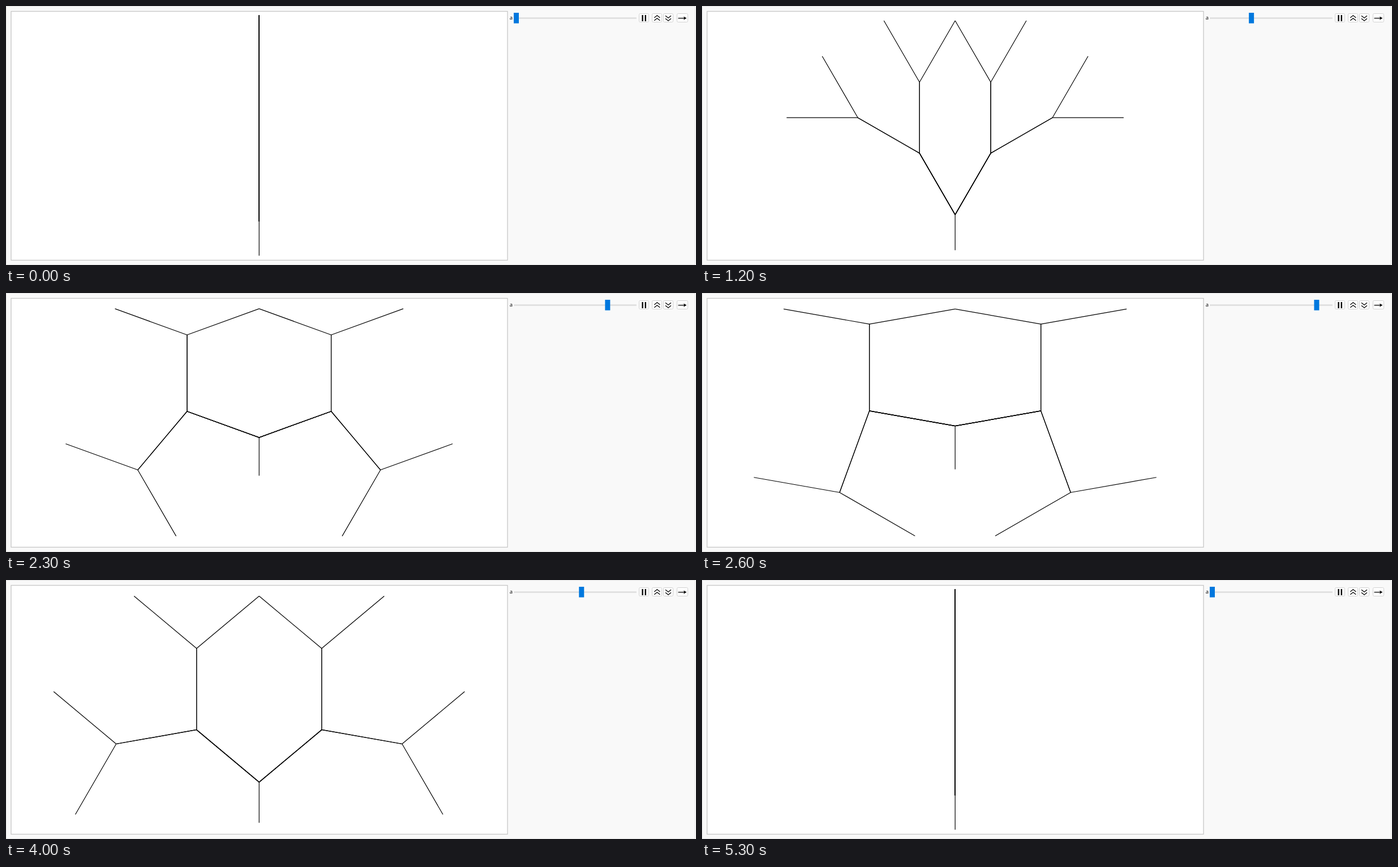
An HTML page for the animation above (6 s loop, 1219 by 459 pixels).

```html
<!DOCTYPE html>
<html lang="en">
<head>
<meta charset="utf-8">
<title>Branching tree</title>
<style>
  html, body { margin: 0; width: 100%; height: 100%; overflow: hidden; background: #fff; }
  svg { display: block; width: 1219px; height: 459px; }
  text { font: 9.5px "Open Sans", "Noto Sans", sans-serif; }
  .line { fill: none; stroke: #000; stroke-width: 1.2; stroke-linejoin: round; }
  .button { fill: #fff; stroke: #d2d2d2; }
  .icon { fill: none; stroke: #000; stroke-width: 1.3; }
</style>
</head>
<body>
<svg viewBox="0 0 1219 459">
  <rect x=".5" y=".5" width="1217" height="458" fill="#f9f9f9" stroke="#e4e4e4"/>
  <rect x="9" y="9.5" width="877" height="441" fill="#fff" stroke="#c6c6c6" stroke-width="1.3"/>
  <g id="tree"></g>

  <text x="889.7" y="24">a</text>
  <rect x="897" y="20.3" width="217" height="2.4" rx="1" fill="#dedede"/>
  <rect id="thumb" x="897" y="12" width="9" height="18.7" fill="#0078de"/>

  <g class="button">
    <rect x="1118.5" y="13.5" width="17" height="15" rx="2"/>
    <rect x="1141.5" y="13.5" width="17" height="15" rx="2"/>
    <rect x="1161.5" y="13.5" width="17" height="15" rx="2"/>
    <rect x="1185.5" y="13.5" width="19" height="15" rx="2"/>
  </g>
  <path d="M1123.4 16h2.3v11h-2.3zM1128.6 16h2.3v11h-2.3z"/>
  <path class="icon" d="M1145.3 20.8l5-4 5 4M1145.3 25.8l5-4 5 4"/>
  <path class="icon" d="M1165 17.2l5 4 5-4M1165 22.2l5 4 5-4"/>
  <path class="icon" d="M1187.5 21.6h12"/>
  <path d="M1197 18.4l5.4 3.2-5.4 3.2 1.2-3.2z"/>
</svg>
<script>
const LOOP = 6000;
const CENTER = { x: 447.2, y: 229.4 };
const STARTS = [0, 700, 1000, 1200, 1500, 1800, 2000, 2300, 2600, 2900,
  3100, 3400, 3700, 4000, 4200, 4500, 4800, 5000, 5300];
// Drawn height of the tree for each ten-degree step
const HEIGHTS = [426, 420.6, 413.3, 406.7, 404, 401.8, 402.3, 403, 402, 426];

const tree = document.getElementById('tree');
const thumb = document.getElementById('thumb');

const lines = Array.from({ length: 9 }, () => {
  const line = document.createElementNS('http://www.w3.org/2000/svg', 'polyline');
  line.setAttribute('class', 'line');
  return tree.appendChild(line);
});

// One path per leaf, so that shared branches overlap
function leafPath(leaf, angle) {
  let x = 0, y = 0.5, heading = 0;
  const points = [[x, y]];
  for (let level = 0; level < 3; level++) {
    heading += leaf >> level & 1 ? angle : -angle;
    x += Math.sin(heading);
    y += Math.cos(heading);
    points.push([x, y]);
  }
  return points;
}

function buildPaths(step) {
  const paths = [[[0, 0], [0, 0.5]]];
  // At a right angle only the trunk is left
  if (step < 9) {
    for (let leaf = 0; leaf < 8; leaf++) paths.push(leafPath(leaf, step * Math.PI / 18));
  }
  return paths;
}

function draw(step) {
  const paths = buildPaths(step);
  const ys = paths.flat().map(p => p[1]);
  const low = Math.min(...ys), high = Math.max(...ys);
  const scale = HEIGHTS[step] / (high - low);
  const place = ([x, y]) =>
    (CENTER.x + x * scale).toFixed(2) + ',' +
    (CENTER.y - (y - (low + high) / 2) * scale).toFixed(2);
  lines.forEach((line, i) =>
    line.setAttribute('points', (paths[i] || []).map(place).join(' ')));
  thumb.setAttribute('x', 897 + step * 23.05);
}

let shown = -1;
function tick() {
  const t = performance.now() % LOOP;
  const i = STARTS.filter(s => s <= t).length - 1;
  const step = Math.min(i, 18 - i);
  if (step !== shown) draw(shown = step);
  requestAnimationFrame(tick);
}
tick();
</script>
</body>
</html>
```
